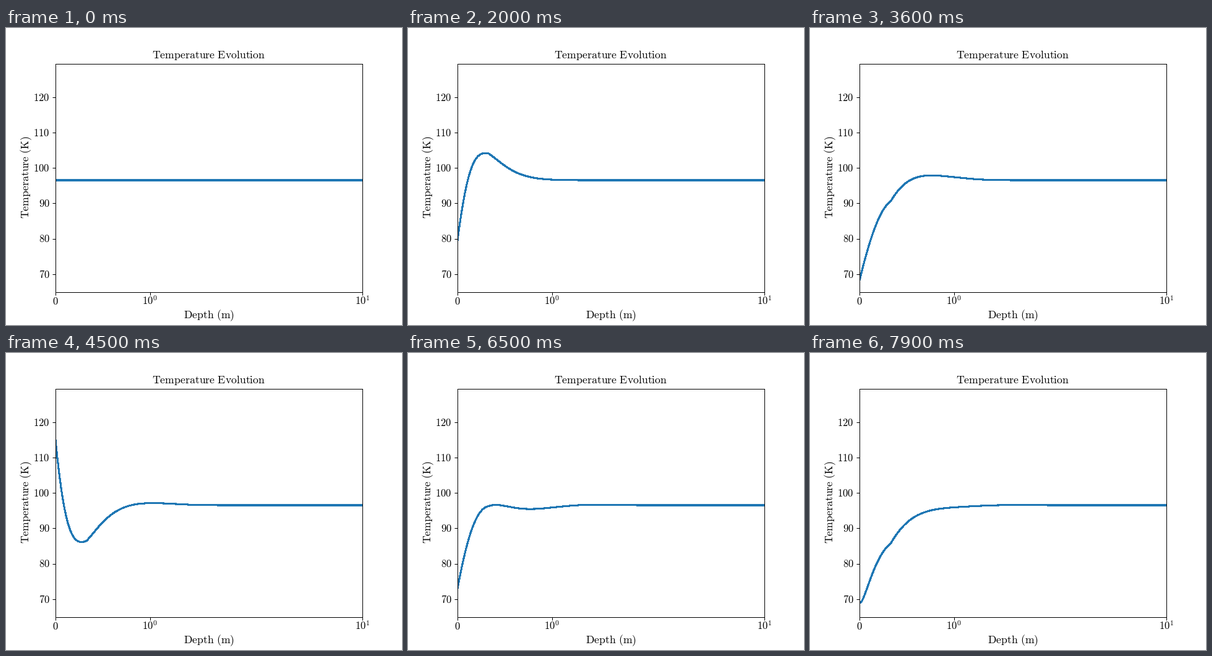
Animation, 640 px wide and 480 px high, one loop 8 s. Source, as a matplotlib script:

```python
"""Subsurface temperature of a two-layer ground under a day/night cycle."""
import numpy as np
import matplotlib.pyplot as plt
from matplotlib.animation import FuncAnimation

W, H, DPI = 640, 480, 100
FRAMES, INTERVAL = 80, 100
STEPS = 100                    # solver steps per frame

T0 = 96.54                     # initial and deep temperature (K)
DAY, SUNRISE = 4.07, 3.77      # length of a day and a sunrise (s of animation)
SUN = 2.52e8                   # absorbed sunlight at noon, as T^4
SURFACE_COND = 2.0e5           # weight of the ground flux against T^4
LAYER = 0.33                   # depth of the upper layer (m)
COND = 0.025, 0.010            # conductivity above and below
HEAT = 1.0, 0.244              # heat capacity above and below


def sunlight(t):
    return SUN * max(0, np.sin(2 * np.pi * (t - SUNRISE) / DAY))


def simulate(z):
    """Heat conduction under a radiating surface, one profile per frame."""
    dz, dt = z[1] - z[0], INTERVAL / 1000 / STEPS
    upper = (z[1:] + z[:-1]) / 2 < LAYER
    cond = np.where(upper, *COND)
    heat = np.where(upper, *HEAT)
    heat = (heat[1:] + heat[:-1]) / 2
    temp = np.full(z.size, T0)
    profiles = []
    for n in range(FRAMES * STEPS):
        if n % STEPS == 0:
            profiles.append(temp.copy())
        flux = cond * np.diff(temp) / dz
        temp[1:-1] += dt * np.diff(flux) / (dz * heat)
        # Newton step for: sunlight + ground flux = radiation
        ts, t1, t2 = temp[:3]
        slope = (4 * t1 - 3 * ts - t2) / (2 * dz)
        excess = sunlight((n + 1) * dt) + SURFACE_COND * slope - ts**4
        temp[0] += excess / (4 * ts**3 + 1.5 * SURFACE_COND / dz)
    return profiles


depth = np.arange(0, 4.5, 0.01)
profiles = simulate(depth)

plt.rcParams.update({
    "mathtext.fontset": "cm",
    "axes.linewidth": 0.72,
    "xtick.major.width": 0.72,
    "ytick.major.width": 0.72,
})
fig = plt.figure(figsize=(W / DPI, H / DPI), dpi=DPI, facecolor="white")
ax = fig.add_axes([0.125, 0.11, 0.775, 0.77])
ax.set_xscale("symlog", linthresh=1, linscale=0.4)
ax.set_xlim(0, 10)
ax.set_ylim(64.87, 129.48)
ax.set_xticks([0, 1, 10])
ax.set_yticks(range(70, 121, 10))
ax.minorticks_off()
ax.tick_params(labelbottom=False, labelleft=False)


def label(x, y, text, size=12.8, ha="center", **kw):
    """Upright Computer Modern text with its baseline at pixel (x, y)."""
    body = text.replace(" ", r"\ ")
    fig.text(x / W, 1 - y / H, rf"$\mathrm{{{body}}}$", fontsize=size,
             ha=ha, va="baseline", **kw)


label(328, 49.3, "Temperature Evolution")
label(328, 469, "Depth (m)")
label(36.8, 241.5, "Temperature (K)", rotation=90, rotation_mode="anchor")
for x, text in ((80, "0"), (232.6, "10^{0}"), (576, "10^{1}")):
    label(x, 447, text, 12)
for k in range(70, 121, 10):
    label(70.6, 403.5 - (k - 70) * 5.72, str(k), 12, ha="right")

line, = ax.plot([], [], color="#1f77b4", lw=1.5, antialiased=False)


def update(n):
    line.set_data(np.append(depth, 10), np.append(profiles[n], T0))
    return line,


anim = FuncAnimation(fig, update, frames=FRAMES, interval=INTERVAL, repeat=True)
plt.show()
```
